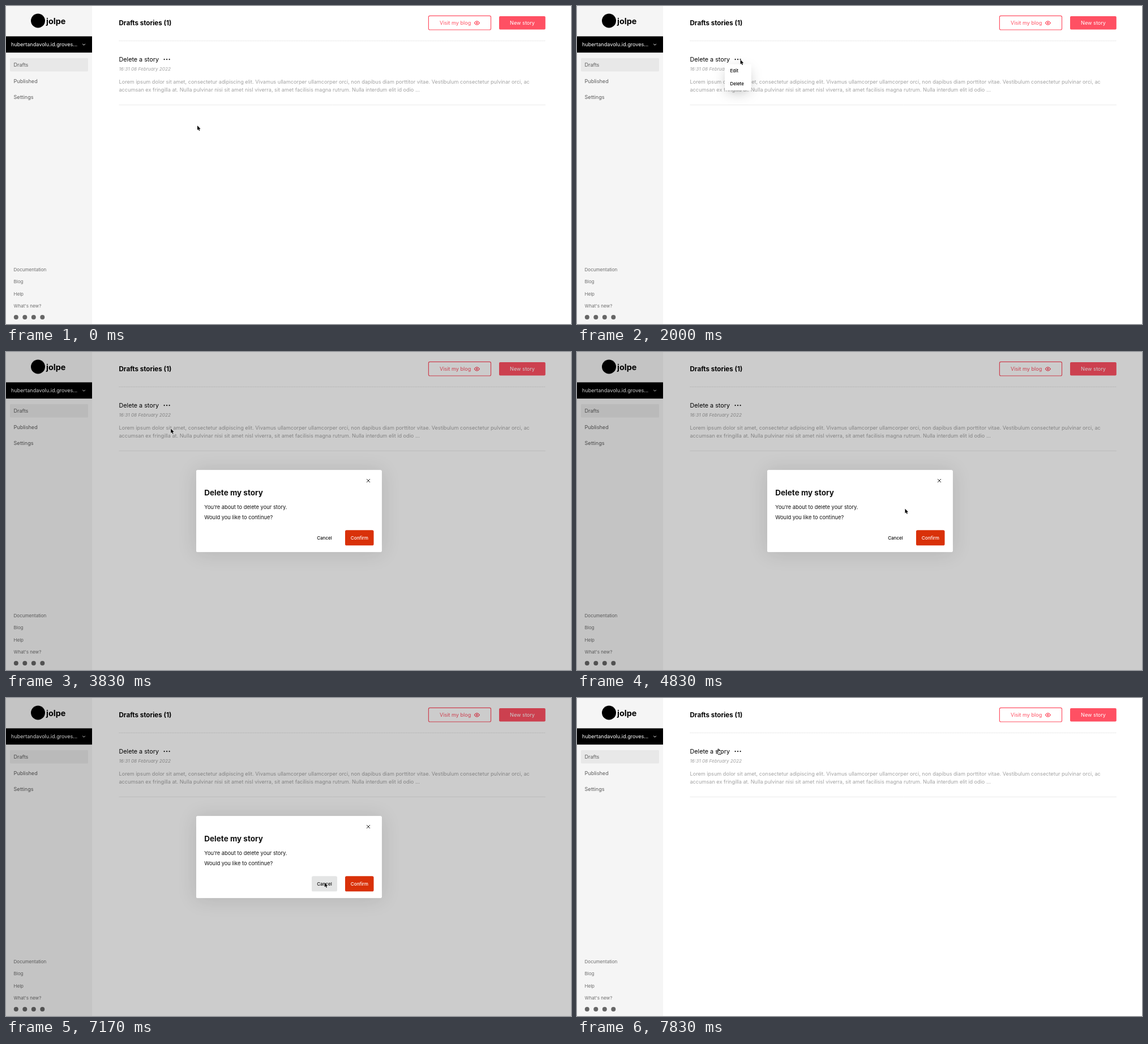
An HTML page with a canvas for the animation above (8 s loop, 998 by 561 pixels).

```html
<!DOCTYPE html>
<html lang="en">
<head>
<meta charset="utf-8">
<title>Delete a draft</title>
<style>
  html, body { margin: 0; width: 100%; height: 100%; overflow: hidden; background: #fff; }
  canvas { display: block; width: 998px; height: 561px; }
</style>
</head>
<body>
<canvas id="stage" width="998" height="561"></canvas>
<script>
const ctx = document.getElementById('stage').getContext('2d');
const W = 998, H = 561, LOOP = 8000, FPS = 6;
const RED = '#ff5063';

function text(str, x, y, size, color, style = '400', align = 'left') {
  ctx.font = `${style} ${size}px Inter, sans-serif`;
  ctx.textAlign = align;
  ctx.fillStyle = color;
  ctx.fillText(str, x, y);
}

function box(x, y, w, h, r, fill, stroke) {
  ctx.beginPath();
  ctx.roundRect(x, y, w, h, r);
  if (fill) { ctx.fillStyle = fill; ctx.fill(); }
  if (stroke) { ctx.strokeStyle = stroke; ctx.lineWidth = 1.2; ctx.stroke(); }
}

function dot(x, y, r, color) {
  ctx.beginPath();
  ctx.arc(x, y, r, 0, Math.PI * 2);
  ctx.fillStyle = color;
  ctx.fill();
}

function line(points, color, width, dash = []) {
  ctx.beginPath();
  points.forEach(([x, y]) => ctx.lineTo(x, y));
  ctx.setLineDash(dash);
  ctx.strokeStyle = color;
  ctx.lineWidth = width;
  ctx.stroke();
  ctx.setLineDash([]);
}

// White panel; the shadow may start inside its edges
function panel(x, y, w, h, r, { alpha, blur, drop, inset }) {
  ctx.save();
  ctx.shadowColor = `rgba(22,23,24,${alpha})`;
  ctx.shadowBlur = blur;
  ctx.shadowOffsetY = drop;
  box(x + inset, y + inset, w - 2 * inset, h - 2 * inset, r, '#fff');
  ctx.restore();
  box(x, y, w, h, r, '#fff');
}

function sidebar() {
  ctx.fillStyle = '#f5f5f5';
  ctx.fillRect(0, 0, 152, H);
  dot(56.5, 26, 12.5, '#000');
  text('jolpe', 71, 31.5, 14.4, '#000', '700');

  ctx.fillStyle = '#000';
  ctx.fillRect(0, 53.5, 152, 28.7);
  text('hubertandavolu.id.groves...', 9, 71.4, 9.1, '#fff');
  line([[135.2, 66.8], [137.5, 69.1], [139.8, 66.8]], '#fff', 1);

  box(7, 92, 138, 23.5, 1.5, '#e8e8e8');
  ['Drafts', 'Published', 'Settings'].forEach((s, i) =>
    text(s, 13.5, 107.2 + i * 28.6, 9.1, '#5c5c5c'));
  ['Documentation', 'Blog', 'Help', "What's new?"].forEach((s, i) =>
    text(s, 13.5, 468 + i * 21.45, 8.06, '#6e6e6e'));
  for (let i = 0; i < 4; i++) dot(17.8 + i * 15.5, 549, 4, '#666');
}

function eye(x, y) {
  ctx.beginPath();
  ctx.moveTo(x - 4.6, y);
  ctx.quadraticCurveTo(x, y - 6.6, x + 4.6, y);
  ctx.quadraticCurveTo(x, y + 6.6, x - 4.6, y);
  ctx.strokeStyle = RED;
  ctx.lineWidth = 1.2;
  ctx.stroke();
  dot(x, y, 1.6, RED);
}

function content() {
  text('Drafts stories (1)', 199.5, 34, 11.6, '#000', '700');
  box(746.4, 17.4, 110.1, 24.6, 2.2, null, RED);
  text('Visit my blog', 766, 33.3, 9.1, RED);
  eye(831.8, 29.9);
  box(871, 18, 81.8, 23.6, 2, RED);
  text('New story', 912, 33.3, 9.1, '#fff', '400', 'center');
  line([[199.5, 61.5], [953, 61.5]], '#e2e2e2', 1, [2, 1]);

  text('Delete a story', 199.5, 98, 10.75, '#000');
  for (let i = 0; i < 3; i++) dot(279.6 + i * 4.5, 94.2, 1.1, '#111');
  text('16:31 08 February 2022', 199.5, 113.8, 8.2, '#a0a0a0', 'italic 400');
  text('Lorem ipsum dolor sit amet, consectetur adipiscing elit. Vivamus ullamcorper ullamcorper orci, ' +
    'non dapibus diam porttitor vitae. Vestibulum consectetur pulvinar orci, ac', 199.5, 137, 9.13, '#a2a2a2');
  text('accumsan ex fringilla at. Nulla pulvinar nisi sit amet nisl viverra, sit amet facilisis magna ' +
    'rutrum. Nulla interdum elit id odio ...', 199.5, 151.3, 9.13, '#a2a2a2');
  line([[199.5, 174.5], [953, 174.5]], '#ebebeb', 1);
}

function menu(alpha, pointerY) {
  ctx.save();
  ctx.globalAlpha = alpha;
  panel(261, 102.8, 46.8, 46, 1.5, { alpha: 0.38, blur: 25, drop: 6.5, inset: 6.5 });
  ['Edit', 'Delete'].forEach((s, i) => {
    const top = 103.2 + i * 22.7;
    const hot = pointerY > top && pointerY < top + 22.7;
    if (hot) box(261, top, 46.8, 22.7, 1, '#131313');
    text(s, 270.5, top + 14.1, 7.95, hot ? '#fff' : '#000', '500');
  });
  ctx.restore();
}

function dialog(x, y) {
  ctx.fillStyle = 'rgba(0,0,0,0.2)';
  ctx.fillRect(0, 0, W, H);
  panel(336, 208.3, 327.7, 144.5, 2.6, { alpha: 0.13, blur: 34, drop: 2, inset: 0 });
  line([[637, 224], [643, 230]], '#222', 1);
  line([[643, 224], [637, 230]], '#222', 1);
  text('Delete my story', 350.3, 252.8, 13.52, '#111', '700');
  text('You’re about to delete your story.', 350.3, 277.3, 9.33, '#111');
  text('Would you like to continue?', 350.3, 294.7, 9.33, '#111');

  const inRow = y > 314 && y < 341;
  if (inRow && x > 540 && x < 585) box(540, 314.3, 45, 27, 2.6, '#e4e5e5');
  const onConfirm = inRow && x > 599 && x < 649;
  box(599, 314.3, 50.5, 27, 2.6, onConfirm ? '#c82b06' : '#d93109');
  text('Cancel', 562.5, 331, 8.06, '#111', '500', 'center');
  text('Confirm', 624.4, 331, 8.06, '#fff', '500', 'center');
}

const arrowPath = new Path2D('M0 0V7.9L1.8 6.3L3.1 9.2L4.4 8.6L3.2 5.9L5.6 5.7Z');
const handPath = new Path2D('M0 .8C0-.4 1.5-.4 1.6 .8L1.9 3.4C2.3 2.7 3.2 2.8 3.5 3.5' +
  'C4 2.9 4.8 3.1 5 3.8C5.8 3.4 6.4 4 6.3 5C6.3 7 5.8 7.6 5.4 9.8H.8' +
  'C.3 8.3-1 7.4-2 6C-2.6 5-1.6 4.3-.8 5L.4 6Z');

function cursor({ x, y }, hand) {
  ctx.save();
  ctx.translate(x, y);
  ctx.lineJoin = 'round';
  ctx.strokeStyle = hand ? '#000' : '#fff';
  ctx.lineWidth = hand ? 0.9 : 1;
  ctx.fillStyle = hand ? '#fff' : '#000';
  if (hand) {
    ctx.fill(handPath);
    ctx.stroke(handPath);
    line([[2.2, 6], [2.3, 8.2]], '#000', 0.5);
    line([[3.9, 6], [3.9, 8.2]], '#000', 0.5);
  } else {
    ctx.stroke(arrowPath);
    ctx.fill(arrowPath);
  }
  ctx.restore();
}

const smooth = u => u * u * (3 - 2 * u);
const easeOut = u => 1 - (1 - u) * (1 - u);

// Pointer journey: start step, end step, target, horizontal easing
const START = { x: 338, y: 211 };
const MOVES = [
  { from: 4, to: 10, x: 288.6, y: 94.8, ease: smooth },
  { from: 14, to: 20, x: 291.2, y: 135.2, ease: smooth },
  { from: 25, to: 31, x: 615.5, y: 326, ease: easeOut },
  { from: 37, to: 40, x: 562.6, y: 325.5, ease: smooth },
  { from: 43, to: 47, x: 248.8, y: 89.8, ease: smooth }
];

function pointerAt(step) {
  const p = { ...START };
  for (const m of MOVES) {
    const u = Math.min(1, Math.max(0, (step - m.from) / (m.to - m.from)));
    p.x += (m.x - p.x) * m.ease(u);
    p.y += (m.y - p.y) * smooth(u);
  }
  return p;
}

function draw(now) {
  const t = now % LOOP;
  const step = Math.min(47, Math.floor((t + 4) * FPS / 1000));
  const p = pointerAt(step);
  const menuOpen = step >= 11 && step < 23;
  const dialogOpen = step >= 23 && step < 44;

  ctx.fillStyle = '#fff';
  ctx.fillRect(0, 0, W, H);
  sidebar();
  content();
  if (menuOpen) menu(step === 11 ? 0.8 : 1, p.y);
  if (dialogOpen) dialog(p.x, p.y);
  cursor(p, step === 10 || step === 47 || (menuOpen && p.y > 103));
  requestAnimationFrame(draw);
}
requestAnimationFrame(draw);
</script>
</body>
</html>
```
